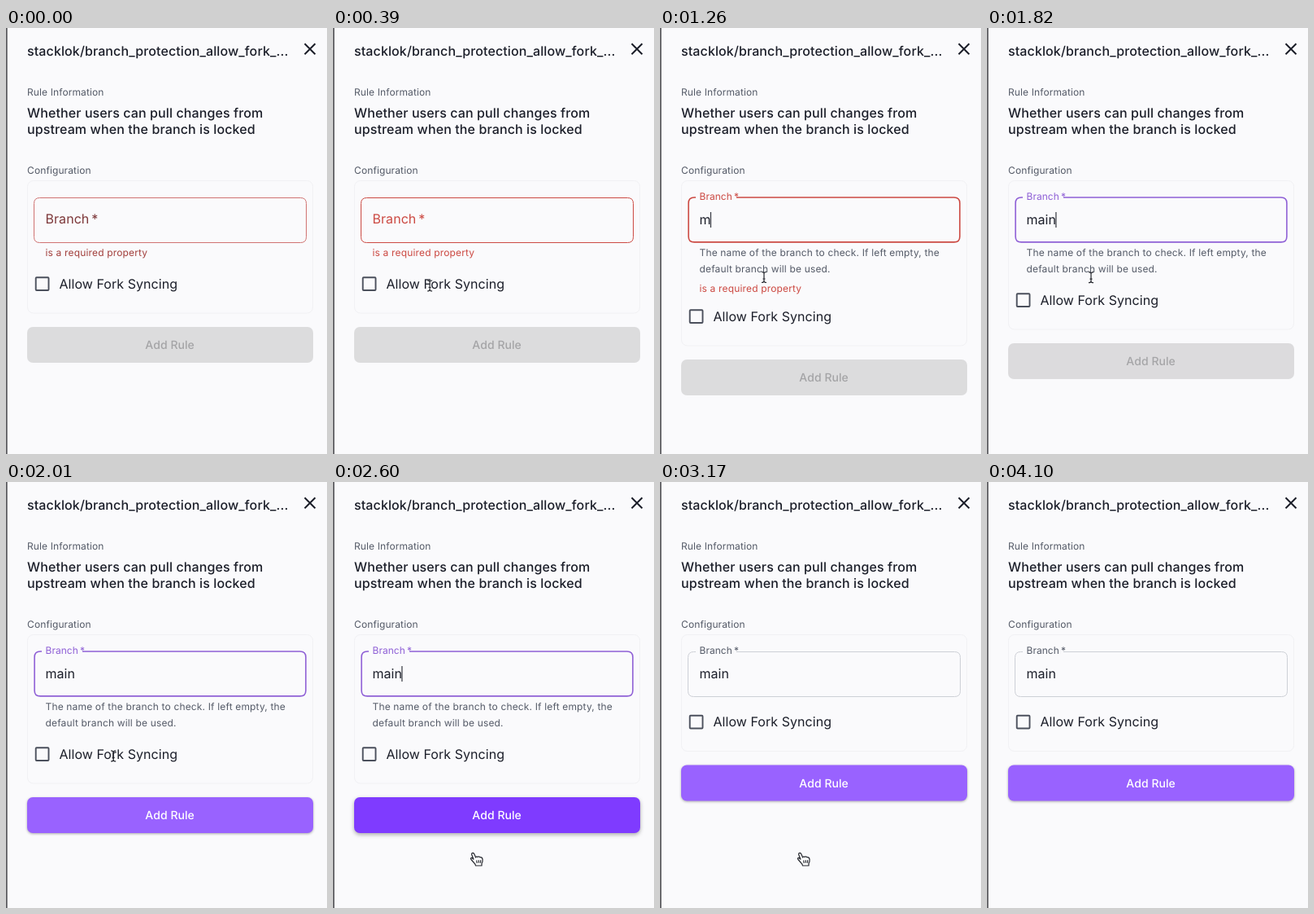
Write an HTML page that moves like this. It is 395 px wide and 523 px high and loops after 4300 ms.

```html
<!DOCTYPE html>
<html lang="en">
<head>
<meta charset="utf-8">
<title>Add rule</title>
<style>
  html, body { margin: 0; width: 100%; height: 100%; overflow: hidden; background: #fafafc; }
  svg { display: block; width: 395px; height: 523px; }
  text { font: 400 16px Inter, sans-serif; letter-spacing: .05px; fill: #1b1e29; text-rendering: geometricPrecision; }
  .strong { font-weight: 500; letter-spacing: .11px; }
  .small { font-size: 12px; letter-spacing: .11px; fill: #555b68; }
  .hint { letter-spacing: .16px; }
  #addText { font-size: 14px; font-weight: 500; text-anchor: middle; }
  #outline, #close, #ibeam { fill: none; }
</style>
</head>
<body>
<svg viewBox="0 0 395 523">
  <rect width="395" height="523" fill="#fafafc"/>
  <rect width="1.7" height="523" fill="#58585c"/>
  <text class="strong" x="26" y="33.5">stacklok/branch_protection_allow_fork_...</text>
  <path id="close" d="M367.5 19.2l13 13m0-13l-13 13" stroke="#1b1e29" stroke-width="2"/>
  <text class="small" x="26" y="83">Rule Information</text>
  <text class="strong" x="26" y="110">Whether users can pull changes from</text>
  <text class="strong" x="26" y="130">upstream when the branch is locked</text>
  <text class="small" x="26" y="179">Configuration</text>
  <rect id="card" x="26.5" y="187.5" width="351" rx="7" fill="none" stroke="#f1f1f4"/>

  <path id="outline"/>
  <text id="label">Branch&thinsp;*</text>
  <text id="value" x="48.5" y="241"></text>
  <rect id="caret" y="226" width="1.2" height="19" fill="#33363f"/>
  <g id="help">
    <text class="small hint" x="48.5" y="280">The name of the branch to check. If left empty, the</text>
    <text class="small hint" x="48.5" y="300">default branch will be used.</text>
  </g>
  <text id="error" class="small hint" x="48.5">is a required property</text>

  <g id="lower">
    <rect x="36.7" y="-7.8" width="15.8" height="15.8" rx="1" fill="none" stroke="#4b505c" stroke-width="1.9"/>
    <text x="65.5" y="5.8">Allow Fork Syncing</text>
    <rect id="add" x="26" y="53" width="352" height="44" rx="7"/>
    <text id="addText" x="201.6" y="80.2">Add Rule</text>
  </g>

  <g id="cursor">
    <path id="ibeam" d="M-3-6.5q3 0 3 2V4.5q0 2-3 2M3-6.5q-3 0-3 2M3 6.5q-3 0-3-2M-1.5 2h3" stroke="#25272e" stroke-width="1.2"/>
    <path id="hand" d="M-3.5 4.5L-7 .5q-1.3-2 .8-2.2L-4 .2-6.3-5.5q-.4-2.2 1.6-2.2Q-3.5-7.5-3-6L-1.4-2q.6-1.7 2.4-.6 1.4-1.2 2.8.3Q6.7-2.6 7 .2 7.5 3 6 5.5V8H-1.5Q-1.7 6-3.5 4.5ZM-.3 1.5l.6 3.5M2.200 1.3l.4 3.5M4.6 1.2v3.5" fill="#fff" stroke="#25272e" stroke-width="1.2" stroke-linejoin="round"/>
  </g>
</svg>
<script>
const LOOP = 4300, FOCUS = 500, VALID = 1820, HOVER = 2200, BLUR = 2990, LEAVE = 3340;
const KEYS = [1260, 1350, 1430, 1500];
const RED = '#cc4a43', PURPLE = '#8f60d6';
const GREY_BG = [220, 220, 221], VIOLET = [153, 98, 255], DEEP = [127, 59, 255];
// time, x, y of the pointer
const PATH = [[200, 100, 339], [480, 128, 306], [1820, 128, 306], [2010, 132, 336], [2290, 177, 463], [LEAVE, 177, 463]];

const $ = id => document.getElementById(id);
const set = (id, attrs) => { for (const k in attrs) $(id).setAttribute(k, attrs[k]); };
const show = (id, on) => set(id, { visibility: on ? 'visible' : 'hidden' });
const ramp = (t, from, length) => Math.min(1, Math.max(0, (t - from) / length));
const easeOut = p => 1 - (1 - p) ** 3;
const mix = (a, b, p) => `rgb(${a.map((v, i) => Math.round(v + (b[i] - v) * p))})`;

function pointer(t) {
  const i = PATH.findIndex(p => p[0] > t);
  if (i < 1) return null;
  const [a, b] = [PATH[i - 1], PATH[i]];
  const p = (t - a[0]) / (b[0] - a[0]);
  return [a[1] + (b[1] - a[1]) * p, a[2] + (b[2] - a[2]) * p];
}

function drawField(t, focused, invalid) {
  const lift = easeOut(ramp(t, FOCUS, 200));
  const fresh = t < 110;
  const border = !invalid ? (focused ? PURPLE : '#cdd0d6') : fresh ? '#d07372' : RED;
  const ink = !invalid ? (focused ? PURPLE : '#555b68') : fresh ? '#7d383a' : RED;
  const inset = focused ? 1.1 : .5;
  const l = 34 + inset, r = 370 - inset, top = focused ? 208 : 208.5, bottom = 264 - inset;
  const c = 7, gap = 44 + 50 * ramp(t, FOCUS, 60);
  set('outline', {
    d: `M${gap} ${top}H${r - c}q${c} 0 ${c} ${c}V${bottom - c}q0 ${c} ${-c} ${c}H${l + c}q${-c} 0 ${-c} ${-c}V${top + c}q0 ${-c} ${c} ${-c}H44`,
    stroke: border, 'stroke-width': focused ? 1.6 : 1
  });
  set('label', {
    transform: `translate(48.5 ${240 - 29 * lift}) scale(${1 - .25 * lift})`,
    style: `fill:${ink}`
  });

  const typed = KEYS.filter(k => k <= t).length;
  $('value').textContent = 'main'.slice(0, typed);
  const lastInput = typed ? KEYS[typed - 1] : FOCUS;
  show('caret', focused && (t - lastInput) % 1000 < 500);
  set('caret', { x: 47.8 + (typed ? $('value').getComputedTextLength() : 0) });

  show('help', focused);
  show('error', invalid);
  set('error', { y: focused ? 323.5 : 280, style: `fill:${fresh ? '#a3413e' : RED}` });
}

function drawLower(t, focused, invalid) {
  const y = !focused ? (invalid ? 314 : 294.5) : invalid ? 354 : 334;
  set('lower', { transform: `translate(0 ${y})` });
  set('card', { height: y + 36 - 187.5 });
  const hover = ramp(t, HOVER, 250) * (1 - ramp(t, BLUR, 150));
  const on = ramp(t, VALID, 150);
  const drop = 1.5 + hover;
  set('add', {
    fill: on < 1 ? mix(GREY_BG, VIOLET, on) : mix(VIOLET, DEEP, hover),
    style: `filter:drop-shadow(0 ${drop}px ${drop}px rgba(0,0,0,${.32 * on}))`
  });
  set('addText', { style: `fill:${mix([164, 164, 166], [255, 255, 255], on)}` });
}

function drawCursor(t) {
  const at = pointer(t);
  show('ibeam', at && t < HOVER);
  show('hand', at && t >= HOVER);
  if (at) set('cursor', { transform: `translate(${at})` });
}

function frame(now) {
  const t = now % LOOP;
  const focused = t >= FOCUS && t < BLUR, invalid = t < VALID;
  drawField(t, focused, invalid);
  drawLower(t, focused, invalid);
  drawCursor(t);
  requestAnimationFrame(frame);
}
requestAnimationFrame(frame);
</script>
</body>
</html>
```
